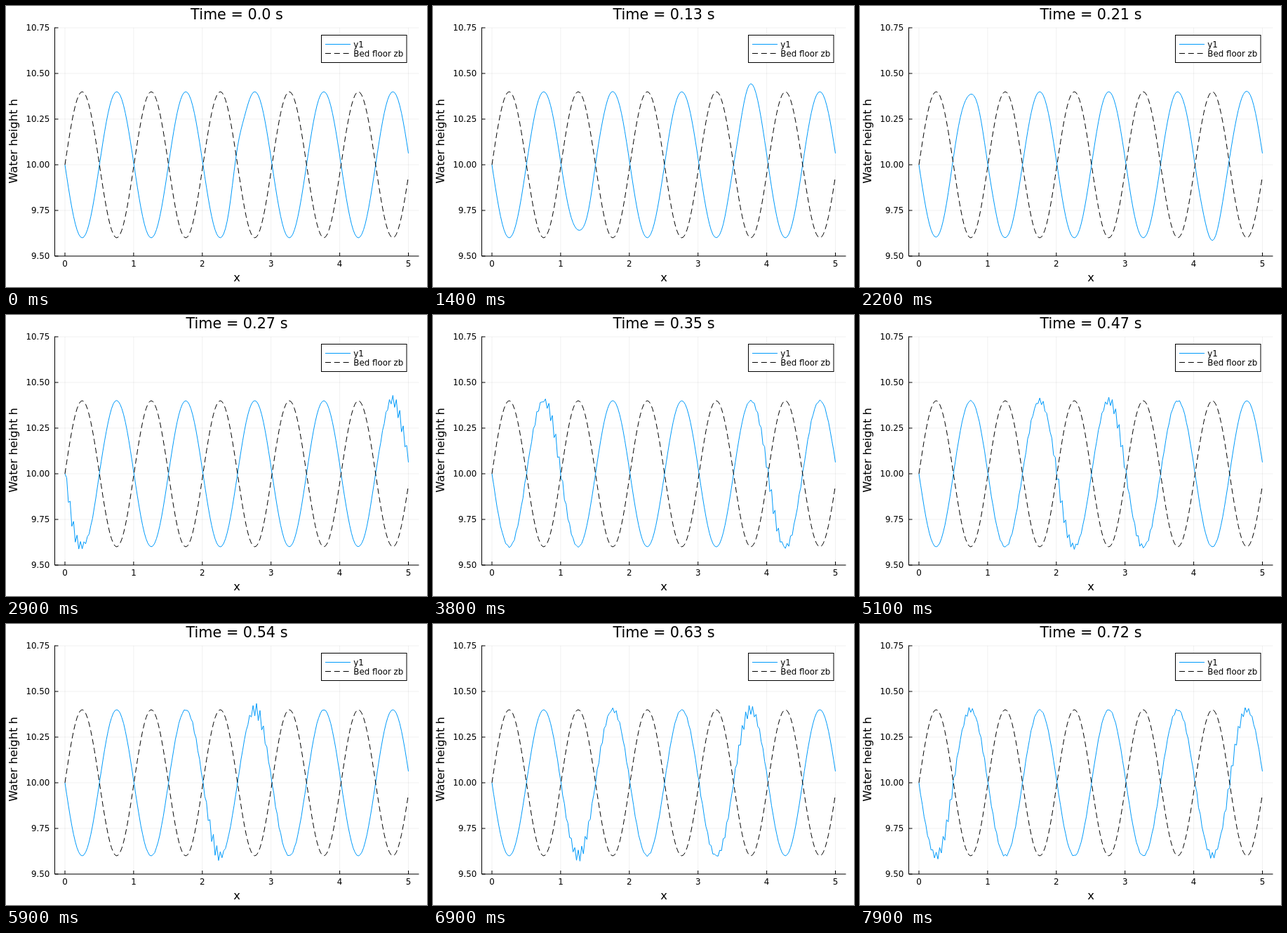
Recreate the animation shown at these times as an HTML page. Size 600 px wide and 400 px high, loop 8 s.

```html
<!DOCTYPE html>
<html lang="en">
<head>
<meta charset="utf-8">
<title>Water height over a wavy bed</title>
<style>
  html, body { margin: 0; width: 100%; height: 100%; overflow: hidden; background: #fff; }
  svg { display: block; width: 600px; height: 400px; }
  text { font-family: "DejaVu Sans", sans-serif; font-size: 11.85px; }
  .label { font-size: 16.3px; text-anchor: middle; }
  .title { font-size: 20.75px; text-anchor: middle; }
  .line { fill: none; stroke: #000; stroke-width: 1; }
  .grid { fill: none; stroke: #000; stroke-opacity: .1; stroke-width: .6; }
  .water { stroke: #009afa; stroke-linejoin: round; }
  .bed { stroke-dasharray: 8 4.8; }
</style>
</head>
<body>
<svg viewBox="0 0 600 400">
  <path id="grid" class="grid"/>
  <path id="axes" class="line"/>
  <g id="ticks"></g>
  <path id="water" class="line water"/>
  <path id="bed" class="line bed"/>
  <rect class="line" x="449.5" y="41.5" width="121.5" height="39" style="fill:#fff"/>
  <path class="line water" d="M455 54.5H491"/>
  <path class="line bed" d="M455 67.5H491"/>
  <text x="495.3" y="59">y1</text>
  <text x="495.3" y="72">Bed floor zb</text>
  <text id="title" class="title" x="329" y="18.8"></text>
  <text class="label" x="329" y="391.5">x</text>
  <text class="label" transform="translate(16 192.5) rotate(-90)">Water height h</text>
</svg>
<script>
const $ = id => document.getElementById(id);
const LOOP = 8000, FRAME = 100, FRAMES = LOOP / FRAME;
const N = 200, DX = 5 / N, GRAVITY = 9.81, SUBSTEPS = 24;

const px = x => 84 + x * 97.9;
const py = h => 356 - (h - 9.5) * 260;
const curve = values => "M" + Array.from(values, (h, j) =>
  px(5 * j / (N - 1)).toFixed(2) + " " + py(h).toFixed(2)).join("L");

const cells = f => Float64Array.from({ length: N }, (_, j) => f(j * DX));
const ripple = x => 0.4 * Math.sin(2 * Math.PI * x);
const depth = cells(x => 10 - ripple(x));
const CENTRE = (N - 1) / 2 * DX;

// Uneven solver steps: the first is negligible, later ones nearly constant.
const simTime = n => n < 2 ? 0 : Math.min(0.0125 * (n - 1), 0.0056 + 0.00908 * n);

// Linear shallow water, centred differences, both unknowns held at the walls.
// The walls turn the smooth pulse into a cell-by-cell zigzag.
function simulate() {
  const surface = cells(x => 0.1 * Math.exp(-(((x - CENTRE) / 0.1) ** 2)));
  const speed = cells(() => 0);
  surface[0] = surface[N - 1] = 0;
  const paths = [];
  for (let n = 0; n < FRAMES; n++) {
    const k = n ? (simTime(n) - simTime(n - 1)) / SUBSTEPS / (2 * DX) : 0;
    for (let s = 0; k && s < SUBSTEPS; s++) {
      for (let j = 1; j < N - 1; j++)
        speed[j] -= k * GRAVITY * (surface[j + 1] - surface[j - 1]);
      for (let j = 1; j < N - 1; j++)
        surface[j] -= k * (depth[j + 1] * speed[j + 1] - depth[j - 1] * speed[j - 1]);
    }
    paths.push(curve(depth.map((h, j) => h + surface[j])));
  }
  return paths;
}

function drawAxes() {
  let grid = "", axes = "M69.5 30.5V356H588.5", labels = "";
  const label = (x, y, anchor, text) =>
    labels += `<text x="${x}" y="${y}" text-anchor="${anchor}">${text}</text>`;
  for (let i = 0; i <= 5; i++) {
    const x = px(i), h = 9.5 + i / 4, y = py(h);
    grid += `M${x} 31V356M69.5 ${y}H588.5`;
    axes += `M${x} 356v-5M69.5 ${y}h5`;
    label(x, 371, "middle", i);
    label(62.3, y + 4.3, "end", h.toFixed(2));
  }
  $("grid").setAttribute("d", grid);
  $("axes").setAttribute("d", axes);
  $("ticks").innerHTML = labels;
}

drawAxes();
$("bed").setAttribute("d", curve(cells(x => 10 + ripple(x))));
const waterPaths = simulate();

function draw(now) {
  const n = Math.floor(now % LOOP / FRAME);
  const seconds = Math.round(simTime(n) * 100) / 100;
  $("water").setAttribute("d", waterPaths[n]);
  $("title").textContent = `Time = ${seconds || "0.0"} s`;
}

let start;
function tick(now) {
  start ??= now;
  draw(now - start);
  requestAnimationFrame(tick);
}
draw(0);
requestAnimationFrame(tick);
</script>
</body>
</html>
```
